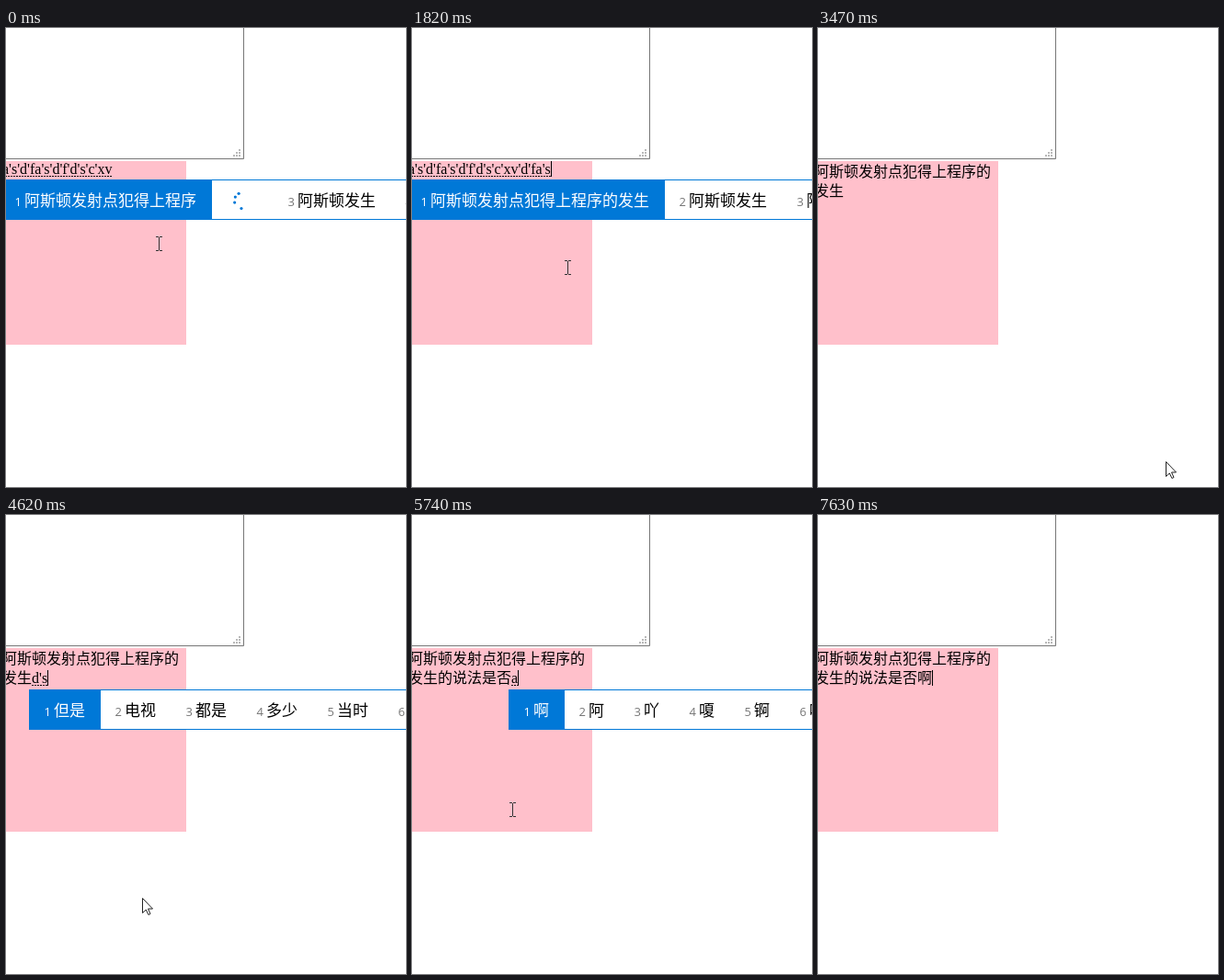
An HTML page that plays this animation: 435x500 px, repeating every 8 s.

```html
<!DOCTYPE html>
<html lang="zh-CN">
<head>
<meta charset="utf-8">
<title>拼音输入</title>
<style>
  html, body { margin: 0; width: 100%; height: 100%; overflow: hidden; background: #fff; }
  svg { display: block; width: 435px; height: 500px; }
  text { white-space: pre; }
  .line { font: 16px "Noto Sans CJK SC", "Noto Sans CJK", sans-serif; }
  .pinyin { font: 16px "Liberation Serif", serif; }
  .word { font: 17px "Noto Sans CJK SC", "Noto Sans CJK", sans-serif; }
  .num { font: 13px "Open Sans", "Noto Sans", sans-serif; fill: #767676; }
  .on { fill: #fff; }
</style>
</head>
<body>
<svg viewBox="0 0 435 500">
  <path d="M258.5 0V142.5H0" fill="none" stroke="#767676"/>
  <path d="M253 132h2v2h-2zM250 135h2v2h-2zM253 135h2v2h-2zM247 138h2v2h-2zM250 138h2v2h-2zM253 138h2v2h-2z" fill="#b8b8b8"/>
  <rect y="145" width="196" height="200" fill="#ffc0cb"/>
  <text id="line1" class="line" x="-4" y="162"/>
  <text id="line2" class="line" x="-4" y="183"/>
  <text id="pinyin" class="pinyin"/>
  <path id="under" stroke="#000" stroke-dasharray="2 1"/>
  <rect id="caret" width="1" height="17"/>
  <g id="panel"></g>
  <path id="beam" d="M-3-7.5H0M1-7.5H4M.5-7V7M-3 7.5H0M1 7.5H4" fill="none" stroke="#333"/>
  <path id="arrow" d="M.5.5V16.5L4.3 13 6.9 18.5 9 17.5 6.5 12H11.5Z" fill="#fff" stroke="#222"/>
</svg>
<script>
const LOOP = 8000, BLUE = '#0078d7', LEFT = -4;
const $ = id => document.getElementById(id);

const base = '阿斯顿发射点犯得上程序';
const keys = "a's'd'fa's'd'f'd's'c'xv";
const first = base + '的发生';
const second = first + '的说法';
const third = second + '是否';
const tail = ['阿斯顿发生', '阿斯顿', '阿斯'];
const ds = ['但是', '电视', '都是', '多少', '当时', '等式'];
const dsf = ['的说法', '大师傅', '得舒服', '电视房', '第三方'];
const sf = ['是否', '身份', '舒服', '收费', '省份', '师父'];
const a = ['啊', '阿', '吖', '嗄', '锕', '呵'];

// '*' marks the busy ring in place of a word
const busy = word => [word, '*', ...tail];

// start, committed text, pinyin, candidates
const typing = [
  [0, '', keys, busy(base)],
  [120, '', keys + "'d", busy(base + '的')],
  [270, '', keys + "'d'f", busy(base + '的发')],
  [420, '', keys + "'d'fa", busy(base + '的发')],
  [570, '', keys + "'d'fa's", busy(first)],
  [980, '', keys + "'d'fa's", [first, ...tail]],
  [2220, first, '', []],
  [4620, first, "d's", ds],
  [4770, first, "d's'f", dsf],
  [4900, first, "d's'fa", dsf],
  [5160, second, '', []],
  [5440, second, "s'f", sf],
  [5590, third, '', []],
  [5740, third, 'a', a],
  [6410, third + '啊', '', []]
];

// start, caret visible
const blink = [
  [0, 0], [120, 1], [1410, 0], [1820, 1], [2640, 0], [3060, 1], [3470, 0],
  [3900, 1], [6140, 0], [6410, 1], [7070, 0], [7630, 1]
];

// start, pointer shape, x, y
const pointer = [
  [0, 'beam', 166, 235], [840, 'beam', 167, 246], [980, 'beam', 169, 261],
  [2490, 'beam', 173, 273], [2640, 'beam', 190, 301], [2790, 'arrow', 225, 342],
  [2920, 'arrow', 262, 378], [3060, 'arrow', 303, 412], [3200, 'arrow', 338, 440],
  [3340, 'arrow', 364, 462], [3470, 'arrow', 378, 472], [3620, ''],
  [4620, 'arrow', 148, 417], [4770, 'arrow', 131, 375], [4900, 'beam', 114, 337],
  [5030, 'beam', 109, 321], [6140, 'beam', 109, 325], [6410, 'beam', 152, 337],
  [6540, 'arrow', 214, 349], [6670, 'arrow', 285, 358], [6800, 'arrow', 352, 366],
  [6940, 'arrow', 408, 371], [7070, '']
];

const ringTimes = [0, 120, 270, 420, 570, 720, 840].map(t => [t]);

const at = (table, t) => table.findLast(row => row[0] <= t);

function set(el, attrs) {
  for (const k in attrs) el.setAttribute(k, attrs[k]);
}

function add(parent, tag, attrs, text = '') {
  const el = document.createElementNS('http://www.w3.org/2000/svg', tag);
  set(el, attrs);
  el.textContent = text;
  parent.append(el);
  return el;
}

function drawRing(g, cx, cy) {
  const ring = add(g, 'g', { id: 'ring', 'data-pos': `translate(${cx} ${cy})` });
  for (const deg of [97, 166, 207, 243]) {
    const r = deg * Math.PI / 180;
    add(ring, 'circle', { cx: 8.6 * Math.cos(r), cy: 8.6 * Math.sin(r), r: 1.6, fill: BLUE });
  }
}

function drawPanel(words, left, top) {
  const g = $('panel');
  g.replaceChildren();
  if (!words.length) return;
  add(g, 'rect', { x: left + .5, y: top + .5, width: 900, height: 43, fill: '#fff', stroke: BLUE });
  let x = left + 1;
  words.forEach((word, i) => {
    if (word === '*') {
      drawRing(g, x + 33, top + 23);
      x += 67;
      return;
    }
    const width = 43 + 17 * word.length, on = i ? '' : ' on';
    if (!i) add(g, 'rect', { x, y: top, width, height: 44, fill: BLUE });
    add(g, 'text', { class: 'num' + on, x: x + 15.5, y: top + 29 }, i + 1);
    add(g, 'text', { class: 'word' + on, x: x + 26, y: top + 29 }, word);
    x += width;
  });
}

function drawText([, done, pinyin, words]) {
  const row = done ? 1 : 0, top = 145 + 24 * row;
  const x = LEFT + 16 * Math.max(0, done.length - 12);
  $('line1').textContent = done.slice(0, 12);
  $('line2').textContent = done.slice(12);
  $('pinyin').textContent = pinyin;
  set($('pinyin'), { x, y: top + 14 });
  const end = pinyin ? x + $('pinyin').getComputedTextLength() : x;
  set($('under'), { d: pinyin ? `M${x} ${top + 16.5}H${end}` : '' });
  set($('caret'), { x: Math.round(end), y: top });
  drawPanel(words, x - 3, row ? 190 : 165);
}

let shown;
function draw(t) {
  const step = at(typing, t);
  if (step !== shown) drawText(shown = step);

  const ring = $('ring');
  if (ring) {
    const turn = at(ringTimes, t)[0] / 90;
    set(ring, { transform: `${ring.dataset.pos} rotate(${turn})` });
  }

  set($('caret'), { visibility: at(blink, t)[1] ? 'visible' : 'hidden' });

  const [, shape, x, y] = at(pointer, t);
  for (const id of ['beam', 'arrow']) {
    set($(id), { visibility: id === shape ? 'visible' : 'hidden' });
  }
  if (shape) set($(shape), { transform: `translate(${x} ${y})` });
}

const start = performance.now();
function tick() {
  draw((performance.now() - start) % LOOP);
  requestAnimationFrame(tick);
}
tick();
</script>
</body>
</html>
```
